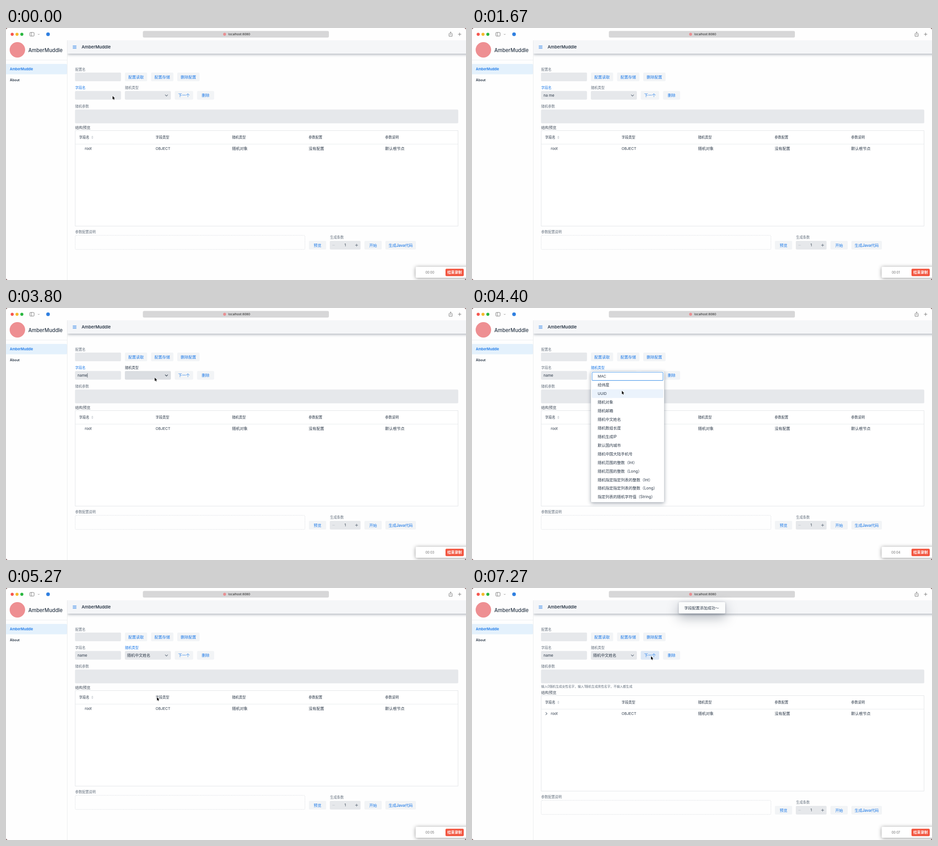
Animation, 1010 px wide and 554 px high, one loop 8 s. Source, as an HTML page with a canvas:

```html
<!DOCTYPE html>
<html lang="zh-CN">
<head>
<meta charset="utf-8">
<title>AmberMuddle</title>
<style>
html, body { margin: 0; width: 100%; height: 100%; overflow: hidden; background: #fff; }
canvas { display: block; width: 1010px; height: 554px; }
</style>
</head>
<body>
<canvas id="stage"></canvas>
<script>
const W = 1010, H = 554, LOOP = 8000;
const FONT = 'Inter, "Noto Sans CJK SC", "Noto Sans CJK", sans-serif';
const BRAND = 'AmberMuddle';
const BLUE = '#1a78e8', BODY = '#2b3848', LABEL = '#626e7c', FIELD = '#e6e8eb', BTN = '#f2f4f6';

const canvas = document.getElementById('stage');
const g = canvas.getContext('2d');
const dpr = window.devicePixelRatio || 1;
canvas.width = W * dpr;
canvas.height = H * dpr;

// pointer: [time, x, y]; an entry without a position hides it
const POINTER = [
  [0, 234, 149.5], [270],
  [3270, 250, 151], [3400, 288, 153], [3530, 318, 154], [3670, 325, 154], [3800, 326.5, 153],
  [4270, 327, 160], [4400, 329, 182], [4530, 331, 205], [4670, 332.5, 224], [4800, 333.5, 235],
  [5000, 332, 239.5], [5130, 331.5, 240],
  [5670, 334, 235], [5800, 351, 195], [6000, 378, 163], [6130, 390, 153], [6270, 393, 150]
];
const TYPED = [[0, ''], [270, 'n'], [400, 'na'], [530, 'na m'], [670, 'na me'], [2670, 'name']];
const CARET = [[0, 0], [270, 1], [1670, 0], [2130, 1], [3270, 0], [3670, 1], [4000, 0]];
const OPTIONS = ['MAC', '经纬度', 'UUID', '随机对象', '随机邮箱', '随机中文姓名', '随机数组长度',
  '随机生成IP', '默认国内城市', '随机中国大陆手机号', '随机范围的整数（Int）', '随机范围的整数（Long）',
  '随机指定指定列表的整数（Int）', '随机指定指定列表的整数（Long）', '指定列表的随机字符值（String）'];
const COLS = [
  ['字段名', 'root'], ['字段类型', 'OBJECT'], ['随机类型', '随机对象'],
  ['参数配置', '没有配置'], ['参数说明', '默认根节点']
];
const ROW = 18.93;

const at = (keys, t) => keys.filter(k => k[0] <= t).pop();

function text(s, x, y, size, color = BODY, weight = 400, align = 'left') {
  g.font = `${weight} ${size}px ${FONT}`;
  g.fillStyle = color;
  g.textAlign = align;
  g.fillText(s, x, y + size * 0.36);
}

function box(x, y, w, h, r, fill, stroke, lw = 1) {
  g.beginPath();
  g.roundRect(x, y, w, h, r);
  if (fill) { g.fillStyle = fill; g.fill(); }
  if (stroke) { g.strokeStyle = stroke; g.lineWidth = lw; g.stroke(); }
}

function dot(x, y, r, fill) {
  g.beginPath();
  g.arc(x, y, r, 0, Math.PI * 2);
  g.fillStyle = fill;
  g.fill();
}

function line(points, color, lw = 1) {
  g.beginPath();
  points.forEach(([x, y], i) => i ? g.lineTo(x, y) : g.moveTo(x, y));
  g.strokeStyle = color;
  g.lineWidth = lw;
  g.stroke();
}

function shape(points, fill) {
  g.beginPath();
  points.forEach(([x, y]) => g.lineTo(x, y));
  g.closePath();
  g.fillStyle = fill;
  g.fill();
}

function card(x, y, w, h, r, color, blur, dy, fill = '#fff') {
  g.save();
  g.shadowColor = color;
  g.shadowBlur = blur * dpr;
  g.shadowOffsetY = dy * dpr;
  box(x, y, w, h, r, fill);
  g.restore();
}

function button(s, x, y, w, fill = BTN) {
  box(x, y, w, 19, 2.2, fill);
  text(s, x + w / 2, y + 9.6, 8.5, BLUE, 500, 'center');
}

const label = (s, x, y, color = LABEL) => text(s, x, y, 7.5, color, 500);

function browser() {
  ['#f6574f', '#f5b92e', '#2bb741'].forEach((c, i) => dot(13.6 + i * 10.6, 13.8, 3.4, c));
  box(52.3, 9.8, 9.4, 8, 1.3, null, '#6d6d6d', 0.9);
  line([[55.6, 9.8], [55.6, 17.8]], '#6d6d6d', 0.8);
  line([[70, 13], [71.8, 14.8], [73.6, 13]], '#777', 0.8);
  dot(92.3, 13.8, 4, '#2f7fe0');
  box(300.5, 6.5, 408.5, 14.5, 3, '#d7d7d8');
  dot(480, 13.8, 3.2, '#e88f92');
  text('localhost:8080', 488, 13.8, 6.8, '#1f1f1f');
  line([[974.4, 12.2], [972.8, 12.2], [972.8, 18.2], [979.6, 18.2], [979.6, 12.2], [978, 12.2]], '#6d6d6d', 0.9);
  line([[976.2, 15.5], [976.2, 8.8]], '#6d6d6d', 0.9);
  line([[974.4, 10.4], [976.2, 8.6], [978, 10.4]], '#6d6d6d', 0.9);
  line([[992.4, 13.8], [999.6, 13.8]], '#6d6d6d', 0.9);
  line([[996, 10.2], [996, 17.4]], '#6d6d6d', 0.9);
}

function frame() {
  g.save();
  g.beginPath();
  g.rect(134.5, 27, W, 60);
  g.clip();
  card(134.5, 27, W, 29.5, 0, 'rgba(30,45,65,.42)', 6, 1.5, '#f5f6f8');
  g.restore();
  line([[134.5, 27], [134.5, H]], '#e6e8ea', 0.8);
  for (const y of [39.2, 42, 44.8]) line([[146.6, y], [154.6, y]], BLUE, 1.1);
  text(BRAND, 166, 42, 9.3, BODY, 600);

  dot(25, 48, 17, '#ee8f92');
  text(BRAND, 49, 49, 11.1, BODY, 500);
  line([[0, 70.5], [134, 70.5]], '#e8eaec', 0.8);
  box(0, 79, 134, 22.7, [0, 2, 2, 0], '#e4f1fc');
  text(BRAND, 8.5, 90.7, 7.4, BLUE, 600);
  text('About', 8.6, 114, 7.3, BODY, 600);
}

function form(t) {
  const nameFocus = t < 4000, chosen = t >= 5270, added = t >= 6800;
  const hoverType = t >= 3400 && t < 4000;

  label('配置名', 152, 91);
  box(151.5, 98, 101, 19, 2.2, FIELD);
  button('配置读取', 261, 98, 49);
  button('配置存储', 318.5, 98, 49);
  button('删除配置', 376, 98, 49);

  label('字段名', 152, 131.5, nameFocus ? BLUE : LABEL);
  box(151.5, 138.5, 101, 19, 2.2, FIELD);
  const typed = at(TYPED, t)[1];
  text(typed, 157, 148, 8.2);
  if (at(CARET, t)[1]) {
    const x = 157.4 + g.measureText(typed).width;
    line([[x, 143.3], [x, 153]], '#25303c', 0.7);
  }

  label('随机类型', 261.3, 131.5, hoverType ? BODY : t >= 4000 && !added ? BLUE : LABEL);
  box(261, 138.5, 101, 19, 2.2, hoverType ? '#dbdee2' : FIELD);
  if (chosen) text('随机中文姓名', 266, 148, 8.5);
  line([[349.3, 146.6], [352.3, 149.6], [355.3, 146.6]], hoverType ? BODY : LABEL, 1.1);
  button('下一个', 370.5, 138.5, 40.5, added ? '#dde8f6' : t >= 6130 ? '#e5edf6' : BTN);
  button('删除', 419.5, 138.5, 37.5);

  label('随机参数', 152, 172, t >= 5800 && t < 6000 ? BODY : LABEL);
  box(151.5, 179.3, 841.5, 30.2, 2.2, FIELD);
  if (added) text('输入0随机生成女性名字，输入1随机生成男性名字，不输入都生成', 152, 216.8, 6.9, LABEL);
}

function results(t) {
  g.save();
  if (t >= 6800) g.translate(0, 11);
  text('结构预览', 152, 219, 8.4, '#3f4a58');
  box(152, 225.5, 840.5, 210, 0, '#fff', '#dfe2e6', 0.9);
  line([[152, 255.3], [992.5, 255.3]], '#e3e6e9', 0.8);
  COLS.forEach(([head, value], i) => {
    const x = 160.5 + i * 168;
    text(head, x, 240.7, 7.5, BODY, 500);
    text(value, i ? x : 173, 265.2, i < 2 ? 8.1 : 8.5);
  });
  shape([[187.3, 239.5], [189.6, 236.9], [191.9, 239.5]], '#c4c9cf');
  shape([[187.3, 241], [189.6, 243.6], [191.9, 241]], '#c4c9cf');
  if (t >= 7000) line([[161.6, 262.2], [164.8, 265.2], [161.6, 268.2]], LABEL, 1.1);

  label('参数配置说明', 152, 448);
  g.setLineDash([2, 1.4]);
  box(152, 455.8, 504.3, 31, 2, null, '#d3d7dc', 0.8);
  g.setLineDash([]);
  button('预览', 665, 468, 38);
  label('生成条数', 711.5, 460.7);
  box(711, 468, 67.5, 19, 2.2, FIELD);
  line([[716.6, 477.5], [721.8, 477.5]], '#c3c8ce', 0.9);
  text('1', 744.6, 477.5, 8.2, BODY, 400, 'center');
  line([[766.8, 477.5], [772.8, 477.5]], LABEL, 1);
  line([[769.8, 474.5], [769.8, 480.5]], LABEL, 1);
  button('开始', 787, 468, 38);
  button('生成Java代码', 833, 468, 67);
  g.restore();
}

function menu(t, tipY) {
  if (t < 4000 || t >= 5270) return;
  g.save();
  g.globalAlpha = t < 4130 ? 0.6 : 1;
  card(261, 139, 161, 288, 2.5, 'rgba(30,45,65,.4)', 9, 2.5);
  box(261, 139, 161, 288, 2.5, '#fff', 'rgba(30,45,65,.16)', 0.6);
  const hover = Math.max(0, Math.floor((tipY - 140.8) / ROW));
  box(263, 140.9 + hover * ROW, 157, ROW, 2, '#ebf3fc');
  box(263.6, 141.2, 155.8, 18.2, 1.5, null, '#4f9bea', 1.1);
  OPTIONS.forEach((s, i) => text(s, 276, 150.3 + i * ROW, /^[A-Z]+$/.test(s) ? 8 : 8.5));
  g.restore();
}

function toast(t) {
  if (t < 7000) return;
  g.save();
  if (t < 7130) { g.globalAlpha = 0.6; g.translate(0, -3); }
  card(454, 31, 102, 25, 2.5, 'rgba(30,45,65,.34)', 26, 9);
  card(454, 31, 102, 25, 2.5, 'rgba(30,45,65,.3)', 4, 1, '#fbfcfc');
  text('字段配置添加成功～', 466, 43.6, 8.5);
  g.restore();
}

function recorder(t) {
  card(899.5, 525, 120, 24, 2, 'rgba(0,0,0,.42)', 8, 1);
  const sec = Math.max(0, Math.floor((t - 270) / 1000));
  text('00:0' + sec, 930.6, 537.3, 6.9, '#6a6a6a', 400, 'center');
  box(965, 529.3, 40, 16.2, 2.2, '#f2553f');
  text('结束录制', 985, 537.3, 8, '#fff', 700, 'center');
}

function pointer(x, y) {
  g.save();
  g.translate(x, y);
  g.beginPath();
  [[0, 0], [0, 7.4], [1.7, 5.9], [2.9, 8.6], [4.1, 8.1], [2.9, 5.5], [5.2, 5.3]].forEach(p => g.lineTo(...p));
  g.closePath();
  g.lineJoin = 'round';
  g.lineWidth = 1.1;
  g.strokeStyle = '#fff';
  g.stroke();
  g.fillStyle = '#0b0b0b';
  g.fill();
  g.restore();
}

function draw(t) {
  const [, x, y] = at(POINTER, t);
  g.setTransform(dpr, 0, 0, dpr, 0, 0);
  g.fillStyle = '#6b3f42';
  g.fillRect(0, 0, W, H);
  g.save();
  g.beginPath();
  g.roundRect(0, 0, W, H, 4.5);
  g.clip();
  g.fillStyle = '#fefefe';
  g.fillRect(0, 0, W, H);
  browser();
  frame();
  form(t);
  results(t);
  menu(t, y);
  toast(t);
  recorder(t);
  if (x !== undefined) pointer(x, y);
  g.restore();
}

const start = performance.now();
function tick() {
  draw((performance.now() - start) % LOOP);
  requestAnimationFrame(tick);
}
tick();
</script>
</body>
</html>
```
